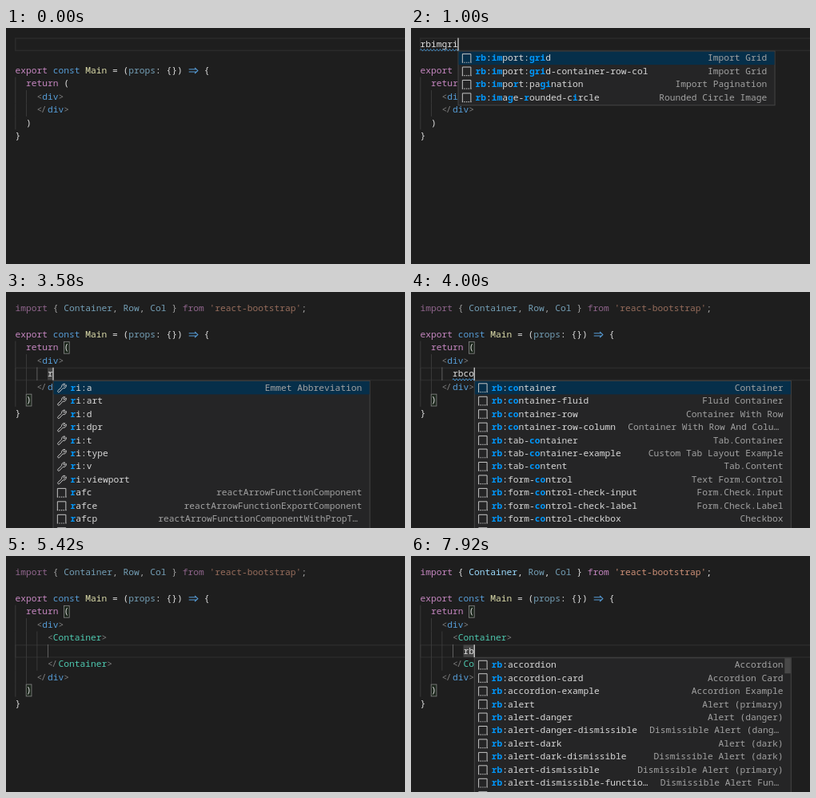
Recreate the animation shown at these times as an HTML page. Size 499 by 296 pixels, loop 8000 ms.

```html
<!DOCTYPE html>
<html lang="en">
<head>
<meta charset="utf-8">
<title>Editor snippets</title>
<style>
html, body { margin: 0; width: 100%; height: 100%; overflow: hidden; background: #1e1e1e; }
svg { display: block; width: 499px; height: 296px; }
text { font: 11.25px "Noto Sans Mono", "DejaVu Sans Mono", monospace; white-space: pre; }
.ui { font: 11.7px Inter, "Liberation Sans", sans-serif; }
</style>
</head>
<body>
<svg id="stage" viewBox="0 0 499 296"></svg>
<script>
const LOOP = 8000, CW = 6.75, LH = 16.45, X0 = 11.5, Y0 = 12.2, POP_W = 396;
const stage = document.getElementById('stage');
const COLORS = {
  k: '#c586c0', b: '#569cd6', f: '#dcdcaa', v: '#9cdcfe', w: '#e0e0e0',
  s: '#ce9178', g: '#808080', t: '#4ec9b0'
};

// Suggestion lists: "name|label"
const LISTS = {
  emmet: ['ri:a|Emmet Abbreviation', 'ri:art', 'ri:d', 'ri:dpr', 'ri:t', 'ri:type', 'ri:v', 'ri:viewport',
    'rafc|reactArrowFunctionComponent', 'rafce|reactArrowFunctionExportComponent',
    'rafcp|reactArrowFunctionComponentWithPropT…', 'rcc|reactClassComponent'],
  all: ['rb:accordion|Accordion', 'rb:accordion-card|Accordion Card', 'rb:accordion-example|Accordion Example',
    'rb:alert|Alert (primary)', 'rb:alert-danger|Alert (danger)',
    'rb:alert-danger-dismissible|Dismissible Alert (dang…', 'rb:alert-dark|Alert (dark)',
    'rb:alert-dark-dismissible|Dismissible Alert (dark)', 'rb:alert-dismissible|Dismissible Alert (primary)',
    'rb:alert-dismissible-functio…|Dismissible Alert Fun…', 'rb:alert-info|Alert (info)', 'rb:alert-light|Alert (light)'],
  images: ['rb:import:grid|Import Grid', 'rb:import:grid-container-row-col|Import Grid',
    'rb:import:pagination|Import Pagination', 'rb:image-rounded-circle|Rounded Circle Image',
    'rb:import:badge|Import Badge', 'rb:import:image|Import Image', 'rb:import:progress-bar|Import Progress Bar',
    'rb:import:list-group|Import List Group', 'rb:import:input-group|Import Input Group',
    'rb:import:button-group|Import Button Group', 'rb:image-rounded|Rounded Image', 'rb:import:figure|Import Figure'],
  cont: ['rb:container|Container', 'rb:container-fluid|Fluid Container', 'rb:container-row|Container With Row',
    'rb:container-row-column|Container With Row And Colu…', 'rb:tab-container|Tab.Container',
    'rb:tab-container-example|Custom Tab Layout Example', 'rb:tab-content|Tab.Content',
    'rb:form-control|Text Form.Control', 'rb:form-control-check-input|Form.Check.Input',
    'rb:form-control-check-label|Form.Check.Label', 'rb:form-control-checkbox|Checkbox',
    'rb:form-control-email|Email']
};
LISTS.grid = LISTS.images.slice(0, 4);

// Timeline: each step changes part of the state
const steps = [[-600, { phase: 0, row: 0, base: 0, word: '', list: '', dim: 0, focus: 1, mark: 0 }]];
const at = (time, change) => steps.push([time, change]);
const type = (word, times, lists) =>
  times.forEach((time, i) => at(time, { word: word.slice(0, i + 1), list: lists[i] }));

type('rbimgri', [170, 330, 500, 580, 750, 920, 1000],
  ['emmet', 'all', 'images', 'images', 'images', 'images', 'grid']);
at(1330, { phase: 1, word: '', base: 54, list: '' });
at(2000, { row: 1, base: 0 });
at(2080, { row: 2, base: 36, dim: 1 });
at(2170, { row: 3, base: 10 });
at(2330, { row: 4, base: 9 });
at(2920, { phase: 2, row: 5, base: 6, mark: 1 });
type('rbcont', [3500, 3670, 3750, 3920, 4080, 4170], ['emmet', 'all', 'cont', 'cont', 'cont', 'cont']);
at(4750, { phase: 3, row: 6, base: 8, word: '', list: '' });
type('rb', [6080, 6250], ['emmet', 'all']);
at(6420, { list: '' });
at(6590, { list: 'loading' });
at(6830, { list: 'all', focus: 0 });
at(6920, { dim: 2 });

function stateAt(t) {
  const s = {};
  for (const [time, change] of steps) {
    if (time > t) break;
    Object.assign(s, change);
    s.since = time;
  }
  s.blink = (t - s.since) % 1000 < 500;
  return s;
}

const colX = c => X0 + c * CW;
const rowY = r => Y0 + r * LH;
const esc = s => s.replace(/&/g, '&amp;').replace(/</g, '&lt;').replace(/>/g, '&gt;');
const rect = (x, y, w, h, fill, stroke = 'none', sw = 1) =>
  `<rect x="${x}" y="${y}" width="${w}" height="${h}" fill="${fill}" stroke="${stroke}" stroke-width="${sw}"/>`;
const path = (d, stroke, w = 1, extra = '') =>
  `<path d="${d}" fill="none" stroke="${stroke}" stroke-width="${w}" ${extra}/>`;
const label = (x, y, s, fill, extra = '') => `<text x="${x}" y="${y}" fill="${fill}" ${extra}>${esc(s)}</text>`;

// A row is [indent, kind, text, kind, text, ...]; a trailing "-" on a kind fades it
const tag = (indent, kind, name) => [indent, 'g', '<', kind, name, 'g', '>'];
const endTag = (indent, kind, name) => [indent, 'g', '</', kind, name, 'g', '>'];

function rowsFor(s) {
  const all = s.dim === 1 ? '-' : '', some = s.dim ? '-' : '';
  const word = [s.base, 'w', s.word];
  const head = s.phase === 0 ? word : [0, 'k' + all, 'import ', 'w' + all, '{ ', 'v' + all, 'Container',
    'w' + all, ', ', 'v' + some, 'Row', 'w' + all, ', ', 'v' + some, 'Col', 'w' + all, ' } ',
    'k' + all, 'from ', 's' + all, "'react-bootstrap'", 'w' + all, ';'];
  const inner = [[], [], [word], [tag(6, 't', 'Container'), word, endTag(6, 't', 'Container')]][s.phase];
  return [head, [0],
    [0, 'k', 'export ', 'b', 'const ', 'f', 'Main ', 'w', '= (', 'v-', 'props', 'w', ': {}) ', 'b', '=>', 'w', ' {'],
    [2, 'k', 'return ', 'w', '('],
    tag(4, 'b', 'div'), ...inner, endTag(4, 'b', 'div'),
    [2, 'w', ')'], [0, 'w', '}']];
}

function drawRow(row, r) {
  const y = rowY(r) + 11.9;
  let col = row[0], out = '';
  for (let i = 1; i < row.length; i += 2) {
    const kind = row[i], text = row[i + 1], x = colX(col), fill = COLORS[kind[0]];
    const fade = kind[1] ? 'opacity=".68"' : '';
    if (text === '=>') {
      const m = rowY(r) + 8.3;
      out += path(`M${x + 1.2} ${m - 1.6}h9.6M${x + 1.2} ${m + 1.6}h9.6M${x + 8.6} ${m - 3.6}l3.8 3.6l-3.8 3.6`, fill, 1.05);
    } else if (text === '</') {
      out += label(x, y, '<', fill) + label(x + CW - 1.6, y, '/', fill);
    } else if (text) {
      out += label(x, y, text, fill, fade);
    }
    col += text.length;
  }
  return out;
}

function guides(rows, s) {
  const active = s.row > 2 ? rows[s.row][0] - 2 : -1;
  let out = '';
  rows.forEach((row, r) => {
    if (r < 3) return;
    for (let c = 0; c < row[0]; c += 2)
      out += rect(colX(c), rowY(r), 0.8, LH, c === active ? '#707070' : '#404040');
  });
  return out;
}

function brackets(rows, s) {
  if (s.row < 2) return '';
  const box = (r, c) => rect(colX(c) + 0.2, rowY(r) + 0.8, CW, LH - 1.6, '#1c261c', '#888', 0.8);
  const end = rows.length - 1;
  return s.row === 2 ? box(2, 35) + box(end, 0) : box(3, 9) + box(end - 1, 2);
}

// Positions of the typed letters in a name, allowing one swapped pair
function matches(word, name) {
  for (let k = 0; k < word.length; k++) {
    const q = [...word];
    if (k) [q[k - 1], q[k]] = [q[k], q[k - 1]];
    const hits = [];
    let from = 0;
    for (const ch of q) {
      const p = name.indexOf(ch, from);
      if (p < 0) break;
      hits.push(p);
      from = p + 1;
    }
    if (hits.length === q.length) return hits;
  }
  return [0, 1];
}

function nameText(x, y, name, word) {
  const hits = matches(word, name);
  const spans = [...name].map((ch, i) => hits.includes(i) ? `<tspan fill="#0097fb" font-weight="600">${ch}</tspan>` : ch);
  return `<text x="${x}" y="${y}" fill="#d8d8d8">${spans.join('')}</text>`;
}

function icon(name, x, y) {
  if (name.startsWith('ri:'))
    return path('M1 9.4L5.8 4.8A3.3 3.3 0 0 1 10 1L8 3.1L9 4.3L11.4 2.3A3.3 3.3 0 0 1 7.3 6.4L2.8 11.2A1.3 1.3 0 0 1 1 9.4Z',
      '#c5c5c5', 1, `transform="translate(${x} ${y})"`);
  return path(`M${x + 0.5} ${y + 11}v-10.5h10.5v10.5`, '#c5c5c5', 1) +
    path(`M${x} ${y + 11.2}h12`, '#c5c5c5', 1.2, 'stroke-dasharray="1.3 1.3"');
}

function popup(s) {
  if (!s.list) return '';
  const x = colX(s.base + s.word.length) + 0.3, y = rowY(s.row + 1) + 0.4;
  if (s.list === 'loading')
    return rect(x, y, 199, 19.6, '#252526', '#454545') + label(x + 21, y + 14.4, 'Loading...', '#d0d0d0', 'class="ui"');
  const items = LISTS[s.list], h = items.length * LH + 2;
  let out = rect(x, y, POP_W, h, '#252526', '#454545');
  items.forEach((item, i) => {
    const [name, info] = item.split('|'), top = y + 0.6 + i * LH, base = top + 11.8;
    if (!i && s.focus) out += rect(x + 0.5, top, POP_W - 1, LH, '#062f4a');
    out += icon(name, x + 4.8, top + 2.4) + nameText(x + 21.4, base, name, s.word);
    if (info) {
      const right = x + POP_W - (info.endsWith('…') ? 15 : 9.8);
      out += label(right, base, info, '#a2a2a2', 'text-anchor="end"');
    }
  });
  if (!s.focus) out += rect(x + POP_W - 8, y + 0.5, 7.5, 19, '#484848');
  return out;
}

function squiggle(s) {
  if (s.word.length < 3) return '';
  const n = Math.round(s.word.length * CW / 4);
  return path(`M${colX(s.base)} ${rowY(s.row + 1) - 1}` + 'q1 -2.4 2 0t2 0'.repeat(n), '#4ba3e8', 0.9);
}

function render(s) {
  const rows = rowsFor(s), x = colX(s.base), end = colX(s.base + s.word.length);
  let out = rect(0, 0, 499, 296, '#1e1e1e');
  out += rect(X0 + 0.3, rowY(s.row) + 0.8, 500, LH - 1.2, 'none', '#2a2a2a', 1.6);
  out += guides(rows, s) + brackets(rows, s);
  if (s.mark && s.word && s.word.length < 3) out += rect(x, rowY(s.row) + 0.4, end - x, LH - 0.8, '#434343');
  out += rows.map(drawRow).join('') + squiggle(s);
  if (s.blink) out += rect(end - 0.4, rowY(s.row) + 0.3, 1.3, LH - 0.4, '#d0d0d0');
  return out + popup(s);
}

let start, shown = '';
function tick(now) {
  start ??= now;
  const s = stateAt((now - start) % LOOP), key = s.since + ' ' + s.blink;
  if (key !== shown) {
    stage.innerHTML = render(s);
    shown = key;
  }
  requestAnimationFrame(tick);
}
stage.innerHTML = render(stateAt(0));
requestAnimationFrame(tick);
</script>
</body>
</html>
```
